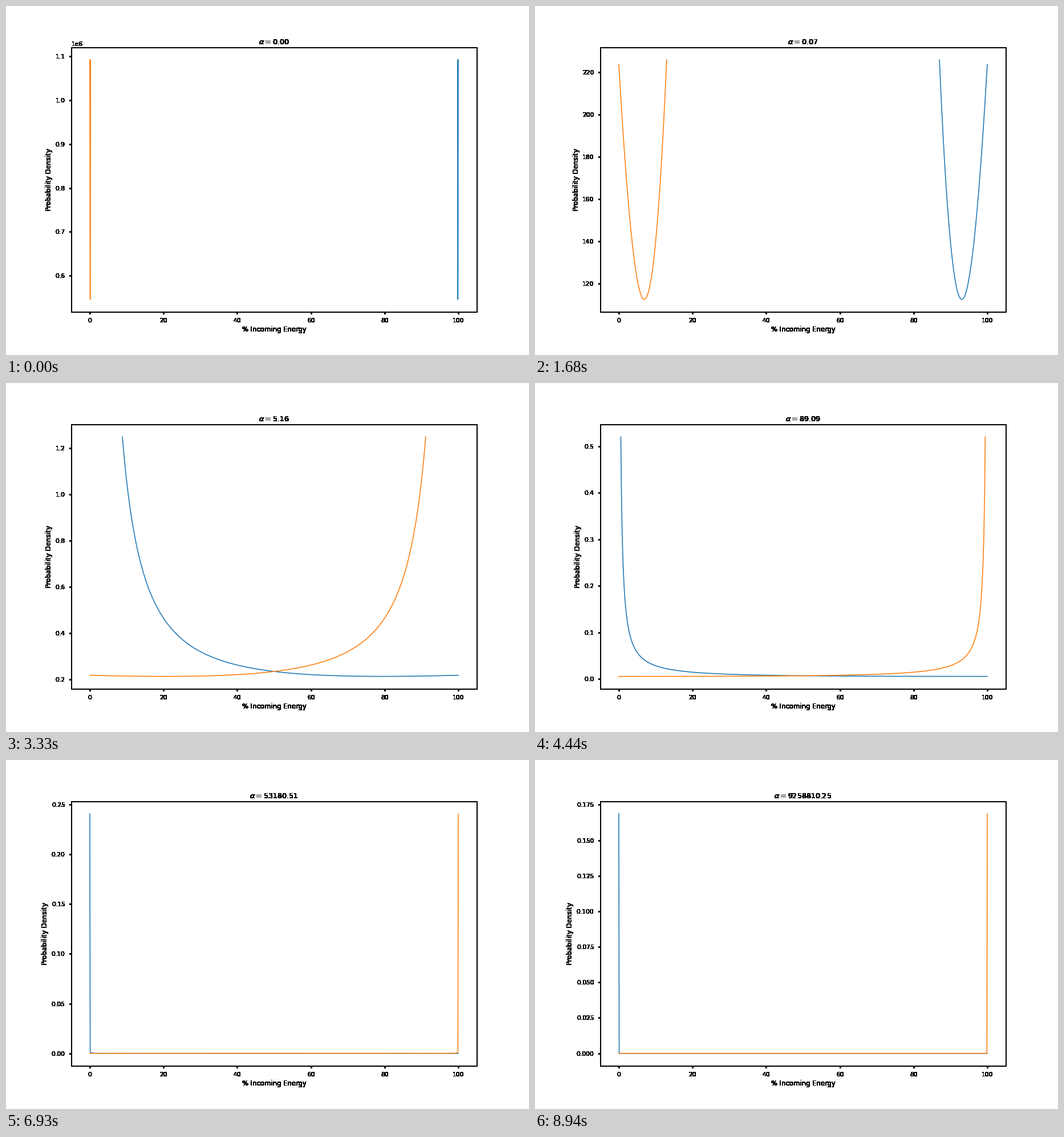
Write a matplotlib script that moves like this. It is 917 px wide and 611 px high and loops after 8.97 s.

```python
import numpy as np
import matplotlib.pyplot as plt
from matplotlib.animation import FuncAnimation

DPI = 76.4
FRAMES = 299
SCALE = 1.4531

plt.rcParams.update({
    "font.family": "DejaVu Sans",
    "font.size": 10,
    "axes.labelsize": 11,
    "axes.titlesize": 12,
    "axes.linewidth": 1,
    "lines.linewidth": 1.5,
    "xtick.major.width": 1,
    "ytick.major.width": 1,
    "xtick.major.pad": 7,
    "ytick.major.pad": 7,
    "figure.subplot.bottom": 0.125,
})

alphas = np.logspace(-3, 7, FRAMES + 1)[:FRAMES]


def spectrum(a):
    """Klein-Nishina density over the electron's share of the energy."""
    top = 2 * a / (1 + 2 * a)
    s = np.linspace(0, top, 1000)
    r = s / (1 - s)
    shape = 2 + (r / a) ** 2 + r * (s - 2 / a)
    log = np.log1p(2 * a)
    total = (2 * top
             + (top - 2 * log + 2 * a) / a ** 2
             + log - top - top ** 2 / 2
             - 2 * (log - top) / a)
    return s, SCALE * shape / (a * total)


def solid(image, dpi):
    """Make every touched pixel opaque: hard, heavy text and frame edges."""
    out = np.rint(image * 255).astype(np.uint8)
    out[..., 3] = np.where(out[..., 3] > 0, 255, 0)
    return out, 0, 0


fig, ax = plt.subplots(figsize=(917.001 / DPI, 611.001 / DPI), dpi=DPI)
photon, = ax.plot([], [], color="#1f77b4")
electron, = ax.plot([], [], color="#ff7f0e")
ax.set_xlim(-5, 105)
ax.set_xlabel("% Incoming Energy")
ax.set_ylabel("Probability Density")
title = ax.set_title("")
# The white axes patch keeps the curves smooth under this filter.
ax.set_agg_filter(solid)


def update(i):
    s, density = spectrum(alphas[i])
    photon.set_data(100 * (1 - s), density)
    electron.set_data(100 * s, density)
    low, high = density.min(), density.max()
    pad = 0.05 * (high - low)
    ax.set_ylim(low - pad, high + pad)
    title.set_text(rf"$\alpha = {alphas[i]:.2f}$")
    return photon, electron, title


anim = FuncAnimation(fig, update, frames=FRAMES, init_func=lambda: update(0),
                     interval=30, repeat=True, repeat_delay=0, blit=False)
plt.show()
```
